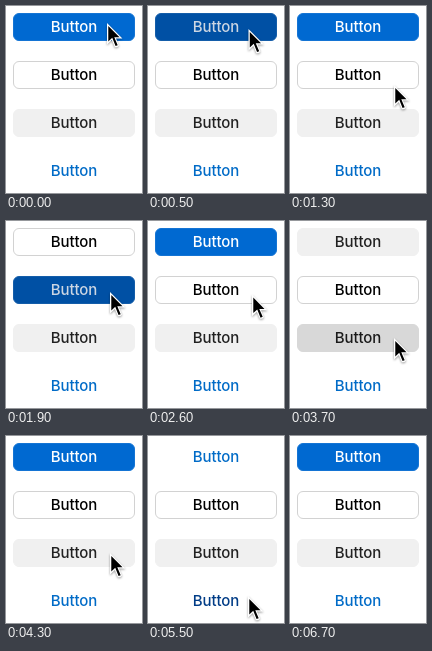
An HTML page for the animation above (7.4 s loop, 136x187 px).

```html
<!DOCTYPE html>
<html lang="en">
<head>
<meta charset="utf-8">
<title>Button styles</title>
<style>
html, body { margin: 0; width: 100%; height: 100%; overflow: hidden; background: #fff; }
.btn {
  position: absolute; left: 7px; width: 122px; height: 28px;
  box-sizing: border-box; border: 1px solid transparent; border-radius: 6px;
  font: 500 15px/26px Inter, Roboto, sans-serif; letter-spacing: -.1px;
  text-align: center; cursor: default; user-select: none;
}
.primary { background: #0069d1; border-color: #1474d4; color: #fff; }
.secondary { background: #fff; border-color: #d2d2d2; color: #000; }
.acrylic { background: #f0f0f0; border-color: #f0f0f0; color: #212121; }
.borderless { color: #006bc7; }
.primary.down, .secondary.down { background: #0050a4; border-color: #145da9; color: #ccd6e3; }
.acrylic.down { background: #d8d8d8; border-color: #d8d8d8; color: #1a1a1a; }
.borderless.down { color: #003c86; }
#pointer {
  position: absolute; left: 0; top: 0; overflow: visible;
  filter: drop-shadow(0 1px 1px rgba(0, 0, 0, .4));
}
</style>
</head>
<body>
<svg id="pointer" width="16" height="25">
  <g transform="scale(1.07)">
    <path fill="#fff" d="M0 0V20.2L4.5 16L7.4 22.6Q9.6 23.2 11.2 21L8.4 14.6H14.4Z"/>
    <path d="M1.2 2.8V17.3L4.9 13.9L8 21.6L10 20.7L6.8 13.4H11.7Z"/>
  </g>
</svg>
<script>
const LOOP = 7400, HIDE = 6700, TICK = 100;
const styles = ["primary", "secondary", "acrylic", "borderless"];
const presses = [
  { from: 500, to: 800 }, { from: 1800, to: 2300 },
  { from: 3700, to: 4300 }, { from: 5400, to: 6100 }
];
const home = { x: 101, y: 17 };
const glides = [
  { from: 0, to: 280, x: 100.5, y: 23 },
  { from: 900, to: 1300, x: 104, y: 79 },
  { from: 1300, to: 1900, x: 104, y: 71 },
  { from: 2500, to: 3200, x: 104, y: 117 },
  { from: 4600, to: 4900, x: 100, y: 160 }
];

const pointer = document.getElementById("pointer");
const buttons = styles.map((_, i) => {
  const b = document.createElement("div");
  b.textContent = "Button";
  b.style.top = 7 + 48 * i + "px";
  document.body.insertBefore(b, pointer);
  return b;
});

const ease = p => p * p * (3 - 2 * p);

function pointerAt(t) {
  return glides.reduce((pos, g) => {
    const p = ease(Math.min(1, Math.max(0, (t - g.from) / (g.to - g.from))));
    return { x: pos.x + (g.x - pos.x) * p, y: pos.y + (g.y - pos.y) * p };
  }, home);
}

const start = performance.now();
function draw() {
  const t = (performance.now() - start) % LOOP;
  const held = presses.findIndex(p => t >= p.from && t < p.to);
  buttons.forEach((b, i) => {
    // the primary button borrows the style of the one held down
    const style = i === 0 && held > 0 ? styles[held] : styles[i];
    b.className = `btn ${style}${i === held ? " down" : ""}`;
  });
  const { x, y } = pointerAt(Math.floor(t / TICK) * TICK);
  pointer.style.transform = `translate(${x}px, ${y}px)`;
  pointer.style.visibility = t < HIDE ? "visible" : "hidden";
  requestAnimationFrame(draw);
}
draw();
</script>
</body>
</html>
```
